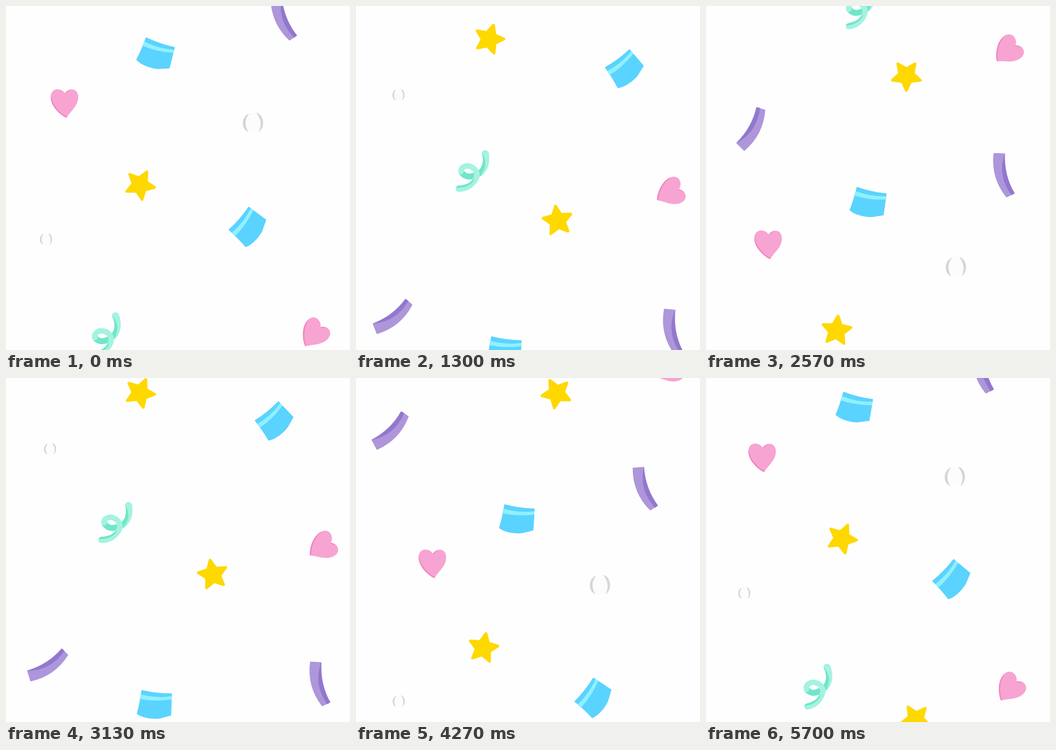
Write an HTML page with a canvas that moves like this. It is 748x748 px and loops after 5730 ms.

```html
<!DOCTYPE html>
<html lang="en">
<head>
<meta charset="utf-8">
<title>Falling confetti</title>
<style>
  html, body { margin: 0; width: 100%; height: 100%; overflow: hidden; background: #fefefe; }
  canvas { display: block; width: 100vw; height: 100vh; }
</style>
</head>
<body>
<canvas id="stage" width="748" height="748"></canvas>
<script>
const ctx = document.getElementById('stage').getContext('2d');
const SIZE = 748, LOOP = 5730, CYCLE = 24, MARGIN = 60;

const fill = (color, d) => ({ color, path: new Path2D(d), filled: true, width: 0 });
const line = (color, width, d) => ({ color, path: new Path2D(d), filled: false, width });
const soft = (color, width, d) => ({ color, path: new Path2D(d), filled: true, width });

// Every shape is drawn around its own centre.
const heart = [
  fill('#f7a4d3', 'M1-22C-5-34-30-37-30-13C-30 5-10 24 2 30Q4 32 6 29C14 16 30 5 30-14C30-33 10-36 1-22Z'),
  fill('#f286c0', 'M-29-19C-33 4-10 24 2 30Q4 32 6 29C-8 22-28 4-29-19Z'),
  fill('#f286c0', 'M1-22Q7-30 14-29Q7-27 2-20Z')
];

const starPoints = Array.from({ length: 10 }, (_, i) => {
  const r = i % 2 ? 15.5 : 32, a = i * Math.PI / 5;
  return `${r * Math.sin(a)} ${-r * Math.cos(a)}`;
});
const star = [soft('#ffd800', 6, 'M' + starPoints.join('L') + 'Z')];

const ball = [
  fill('#fcfcfc', 'M-8-21C-18-10-18 12-9 21Q0 24 12 20C19 10 17-12 8-22Q0-24-8-21Z'),
  fill('#d6d6d6', 'M-8-20C-26-15-27 14-10 20C-19 6-18-9-8-20Z'),
  fill('#d6d6d6', 'M7-22C25-18 27 12 12 20C20 6 17-10 7-22Z')
];

const cloth = [
  soft('#5bd3ff', 2, 'M-24-33Q5-20 38-14L28 31L3 33Q-12 32-26 26Q-36 22-43 15Q-32-8-24-33Z'),
  fill('#8ff0ff', 'M-28-25Q4-10 38-9L36-2Q0-3-32-16Z')
];

const ribbon = [
  soft('#ae96da', 2, 'M-37-35L-15-42Q-1 3 33 32L20 45Q-25 17-37-35Z'),
  fill('#9278cd', 'M-15-43Q-1 3 34 32L29 38Q-15 8-15-43Z')
];

const curl = [
  line('#70e6ca', 13, 'M25-40C31-21 27-1 10 7S-17 13-24 3'),
  fill('#a4f3e0', 'M19-40C19-50 34-48 34-39C37-19 35-2 17 9C27-4 32-20 19-40Z'),
  line('#a4f3e0', 12, 'M-25 2C-26-9-13-13-5-10C10-5 13 9 7 18C-1 32-14 40-29 40'),
  fill('#70e6ca', 'M-34 38C-34 31-26 33-20 31C-10 29 0 23 4 16C4 26-12 37-27 37Q-33 38-34 38Z')
];

// A swing around a mean, highest at the step `peak`.
const wave = (mean, swing = 0, peak = 0, period = 12) =>
  step => mean + swing * Math.cos(2 * Math.PI * (step - peak) / period);

// Each piece falls evenly, sways and tilts; y and x hold at the end of a cycle.
const pieces = [
  { shape: ball, y: 254, speed: 39.2, x: wave(537.1, 10, 20.5, 14), drift: 0.25, tilt: wave(0) },
  { shape: ball, y: 507, speed: 39.2, x: wave(87, 9, 27.5, 14), drift: -0.2, tilt: wave(0), scale: 0.6 },
  { shape: heart, y: 212, speed: 38.4, x: wave(145.3, 24.5, 28.6), drift: -0.65, tilt: wave(0) },
  { shape: heart, y: 714, speed: 38.5, x: wave(664.5, 18, 14.6), drift: -0.45, tilt: wave(56, 14, 17.3, 13) },
  { shape: star, y: 389, speed: 39.6, x: wave(288.3, 7.5, 21.8), drift: -1.1, tilt: wave(17, 12.7, 25) },
  { shape: star, y: 782, speed: 39.4, x: wave(440, 20.7, 12.4), drift: -0.6, tilt: wave(50, 14, 16.7, 17) },
  { shape: cloth, y: 103, speed: 40.3, x: wave(340, 16, 31, 18), drift: 0, tilt: wave(-3, 7.5, 34.6, 9.3) },
  { shape: cloth, y: 478, speed: 43, x: wave(540.4, 20, 17, 18), drift: -3, tilt: wave(-61, 10, 18, 18) },
  { shape: ribbon, y: 26, speed: 42.5, x: wave(604.5, 6.5, 31, 9), drift: 5, tilt: wave(10, 13, 30.9, 9) },
  { shape: ribbon, y: 1081, speed: 51, x: wave(100, 27, 11.2), drift: 0, tilt: wave(-103.2, 14.5, 14.3) },
  { shape: curl, y: 716, speed: 44.6, x: wave(237, 46, 19.85, 13), drift: -3.7, tilt: wave(-2, 6, 14, 18) }
];

function drawPiece({ shape, y, speed, x, drift, tilt, scale = 1 }, step) {
  const age = step - CYCLE, top = y + speed * age;
  if (top < -MARGIN || top > SIZE + MARGIN) return;
  ctx.save();
  ctx.translate(x(step) + drift * age, top);
  ctx.rotate(tilt(step) * Math.PI / 180);
  ctx.scale(scale, scale);
  for (const part of shape) {
    ctx.fillStyle = ctx.strokeStyle = part.color;
    if (part.filled) ctx.fill(part.path);
    if (part.width) {
      ctx.lineWidth = part.width;
      ctx.stroke(part.path);
    }
  }
  ctx.restore();
}

function render(now) {
  // Poses change every 80 ms, shown on a 30 Hz grid.
  const tick = Math.floor((now % LOOP + 4) * 0.03);
  const phase = Math.floor(tick * 5 / 12) % CYCLE;
  ctx.fillStyle = '#fefefe';
  ctx.fillRect(0, 0, SIZE, SIZE);
  ctx.lineCap = ctx.lineJoin = 'round';
  for (const piece of pieces) {
    drawPiece(piece, phase);
    drawPiece(piece, phase + CYCLE);
  }
}

let start;
function loop(now) {
  start ??= now;
  render(now - start);
  requestAnimationFrame(loop);
}
render(0);
requestAnimationFrame(loop);
</script>
</body>
</html>
```
